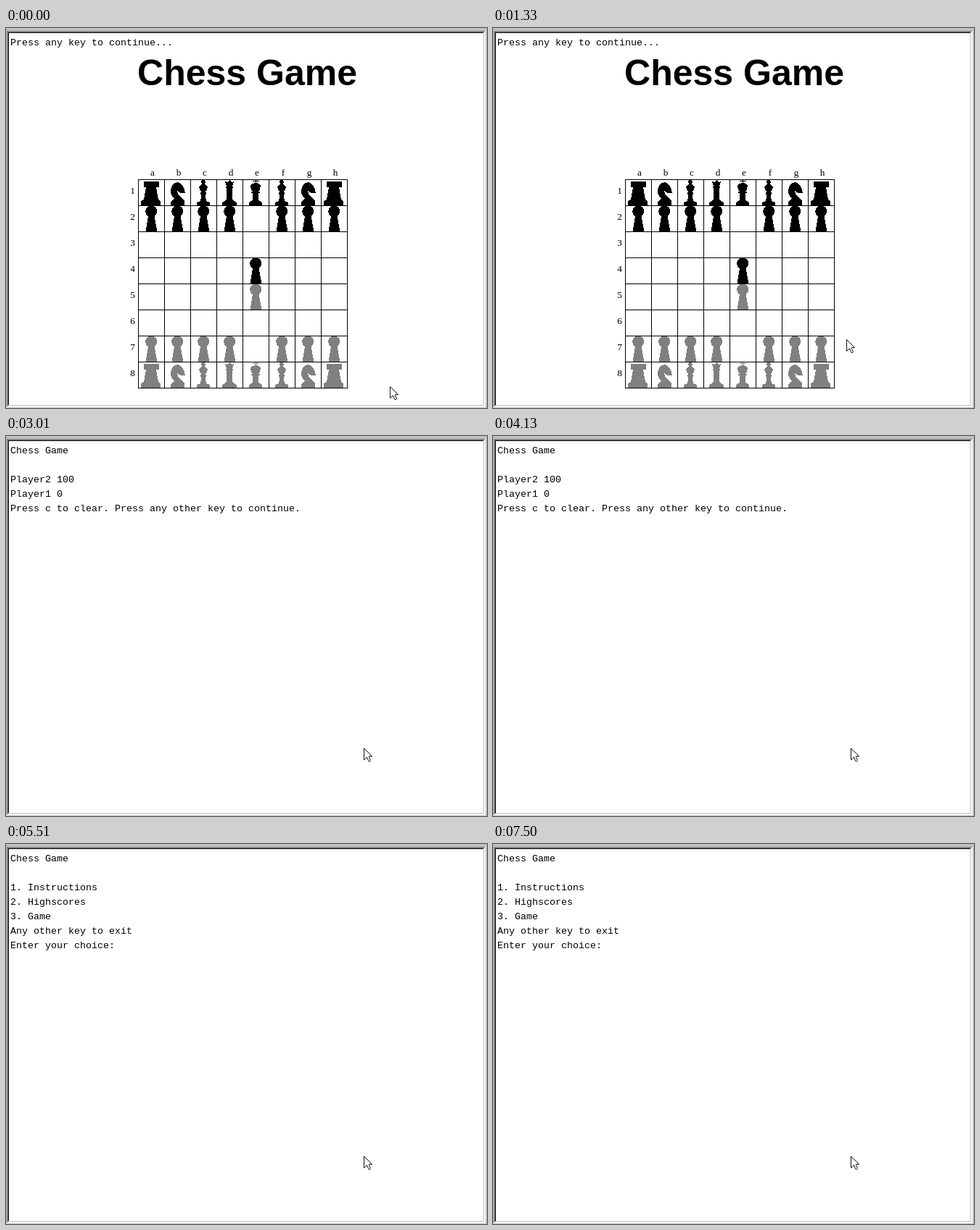
An HTML page that plays this animation: 663 px wide and 525 px high, repeating every 8000 ms.

```html
<!DOCTYPE html>
<html lang="en">
<head>
<meta charset="utf-8">
<title>Chess Game</title>
<style>
  html, body { margin: 0; width: 100%; height: 100%; overflow: hidden; background: #c0c0c0; }
  #stage { position: relative; width: 663px; height: 525px; overflow: hidden; }
  svg { position: absolute; left: 0; top: 0; }
  #lines { font: 13.333px "Liberation Mono", "Courier New", monospace; white-space: pre; }
  .title { font: bold 50px "Liberation Sans", Arial, sans-serif; }
  .axis { font: 13.333px "Liberation Serif", "Times New Roman", serif; }
  .title, .axis { text-anchor: middle; }
</style>
</head>
<body>
<div id="stage">
  <svg width="663" height="525" shape-rendering="crispEdges">
    <rect width="663" height="525" fill="#c0c0c0"/>
    <path d="M1 4H661V524H1Z" fill="#fff"/>
    <path d="M1 4H660V5H659V6H3V522H2V523H1Z" fill="#808080"/>
    <path d="M3 6H658V7H4V521H3Z" fill="#000"/>
    <path d="M658 6H659V522H3V521H658Z" fill="#c0c0c0"/>
  </svg>
  <svg id="board" width="663" height="525"></svg>
  <svg id="lines" width="663" height="525"></svg>
  <svg id="cursor" width="13" height="20">
    <path d="M.5 .5V16.5L4.5 12.7L7 18.5H8.7L9.4 17.3L7.3 12.3L7.5 11.5H11.5Z" fill="#fff" stroke="#111"/>
  </svg>
</div>
<script>
const LOOP = 8000, CELL = 36, LEFT = 182, TOP = 209;
const $ = id => document.getElementById(id);

// Piece outlines inside one 36px cell
const SHAPES = {
  p: 'M14 15A8 8 0 1 1 22.5 15L26.5 36H10.5Z',
  r: 'M8 3H29V11H25L28 28L31 30V36H4V30L8 28L11 11H8Z',
  n: 'M9 36V31L14 27C10 23 9 20 9 16C9 9 13 4 19 4C25 6 28 12 29 19H23L18 16L20 22L28 29V36Z',
  b: 'M16 1H20L21 4L19.5 6L24 11L22 16L20.5 17L22 19V21H20.5L22 30L27 32V36H9V32L14 30L15.5 21H14V19L15.5 17L14 16L12 11L16.5 6L15 4Z',
  q: 'M12 3L15 4L18 1L21 4L24 3L22 10H23V12H21.5L22 27L24 30L28 32V36H8V32L12 30L14 27L14.5 12H13V10H14Z',
  k: 'M18 0H19V2H23V3H19V5L23 6L25 9L24 14L22 17H24V19H22L22.5 29L27 32V36H9V32L13.5 29L14 19H12V17H14L12 14L11 9L13 6L18 5V3H14V2H18Z'
};
const ROWS = ['rnbqkbnr', 'pppp ppp', '', '    p', '    p', '', 'pppp ppp', 'rnbqkbnr'];

function drawBoard() {
  let out = '<text class="title" x="332.5" y="79">Chess Game</text>', grid = '';
  for (let i = 0; i <= 8; i++) {
    grid += `M${LEFT + i * CELL + .5} ${TOP}v289M${LEFT} ${TOP + i * CELL + .5}h289`;
  }
  ROWS.forEach((row, y) => {
    const color = y < 4 ? '#000' : '#808080';
    out += `<text class="axis" x="${202 + y * CELL}" y="204">${'abcdefgh'[y]}</text>`;
    out += `<text class="axis" x="174.5" y="${229 + y * CELL}">${y + 1}</text>`;
    [...row].forEach((piece, x) => {
      if (SHAPES[piece]) {
        out += `<path d="${SHAPES[piece]}" fill="${color}" shape-rendering="crispEdges"
          transform="translate(${LEFT + x * CELL} ${TOP + y * CELL})"/>`;
      }
    });
  });
  $('board').innerHTML = out + `<path d="${grid}" stroke="#000" shape-rendering="crispEdges"/>`;
}

const ANY_KEY = 'Press any key to continue...';
const page = body => ' '.repeat(35) + 'Chess Game\n\n' + body;
const score = (name, points) => name.padEnd(40) + points + '\n';

const MENU = page(`1. Instructions
2. Highscores
3. Game
Any other key to exit
Enter your choice:`);
const SCORES = page(score('Player2', 100) + score('Player1', 0) +
  'Press c to clear. Press any other key to continue.');
const HELP = page(`To play the game, select 3. It will then prompt you for a command.
There are 5 commands, select, move, castle, exit and resign.
To use select, type "select <the coordinate>".
E.g., to select the square e7, I would type in the command "select e7".
To use move, type "move <the coordinate>".
E.g., to move my selected piece to e7, I could use the command "move e5".
You must have already selected a piece and the move must be valid.
Otherwise, it will ask you to input again.
To use castle, type "castle <side>".
E.g. to castle kingside, I would use the command "castle kingside".
To use resign, type "resign". This will cause the opposite color to immediately
win.
To use quit, type "quit". This will cause the game to end with no person winning
.
${ANY_KEY}`);

const SCREENS = [
  [0, ANY_KEY], [1990, MENU], [3010, SCORES], [3420, MENU], [4130, SCORES],
  [4610, MENU], [5000, HELP], [5510, MENU], [6350, SCORES],
  [7140, SCORES + '\n' + ANY_KEY], [7500, MENU]
];

function drawText(text) {
  $('lines').replaceChildren(...text.split('\n').map((line, i) => {
    const node = document.createElementNS('http://www.w3.org/2000/svg', 'text');
    node.setAttribute('x', 6);
    node.setAttribute('y', 24 + i * 20);
    node.textContent = line;
    return node;
  }));
}

// Pointer moves: first step, last step, step count, end x, end y
const START = [529, 495];
const MOVES = [
  [30, 360, 8, 339, 307],
  [590, 700, 3, 327, 295],
  [760, 820, 2, 345, 322],
  [870, 1200, 6, 517, 479],
  [1270, 1330, 2, 487, 430],
  [2070, 2120, 2, 493, 431]
];
const ease = k => k * k * (3 - 2 * k);

function pointerAt(t) {
  let [x, y] = START;
  for (const [from, to, steps, endX, endY] of MOVES) {
    if (t < from) break;
    const step = Math.floor((t - from) / (to - from) * (steps - 1)) + 1;
    const k = ease(Math.min(1, step / steps));
    x += (endX - x) * k;
    y += (endY - y) * k;
  }
  return [Math.round(x), Math.round(y)];
}

let shown;
function render(t) {
  const [start, text] = SCREENS.findLast(([time]) => time <= t);
  if (shown !== text) {
    drawText(shown = text);
    $('board').style.display = start === 0 ? '' : 'none';
  }
  const [x, y] = pointerAt(t);
  $('cursor').style.transform = `translate(${x}px, ${y}px)`;
}

drawBoard();
render(0);
const origin = performance.now();
function tick() {
  render((performance.now() - origin) % LOOP);
  requestAnimationFrame(tick);
}
requestAnimationFrame(tick);
</script>
</body>
</html>
```
